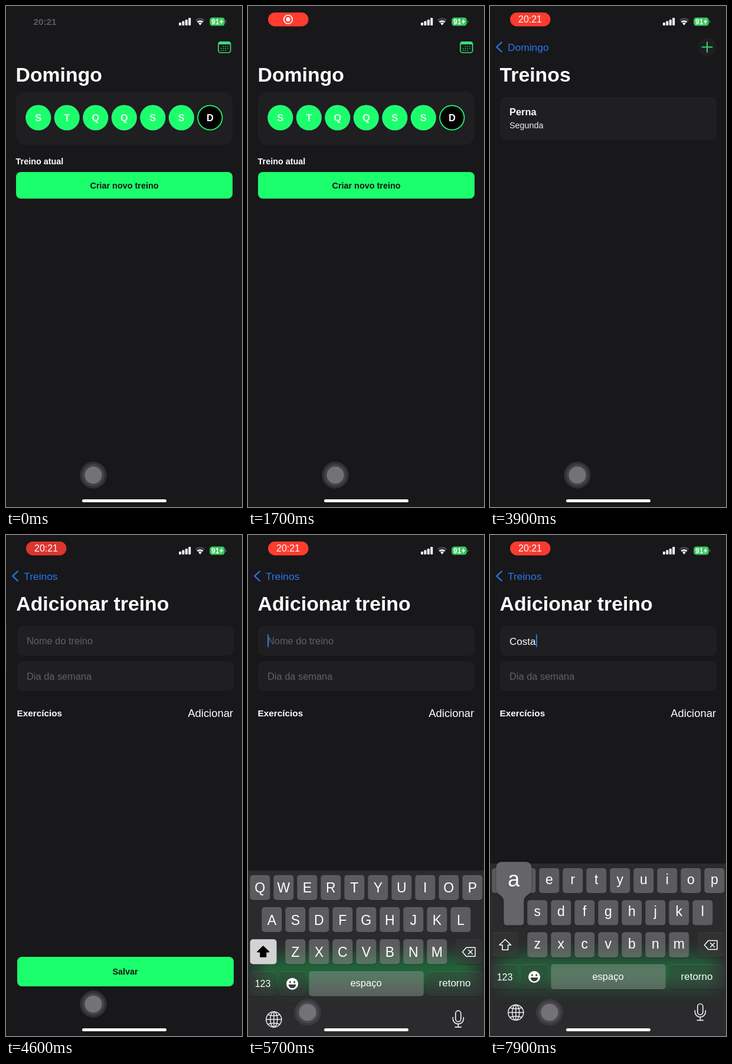
An HTML page with a canvas that plays this animation: 400x848 px, repeating every 8 s.

```html
<!DOCTYPE html>
<html lang="pt">
<head>
<meta charset="utf-8">
<title>Treinos</title>
<style>
  html, body { margin: 0; width: 100%; height: 100%; overflow: hidden; background: #18171a; }
  canvas { display: block; width: 400px; height: 848px; }
</style>
</head>
<body>
<canvas id="stage"></canvas>
<script>
const W = 400, H = 848, LOOP = 8000;
const canvas = document.getElementById('stage');
const dpr = window.devicePixelRatio || 1;
canvas.width = W * dpr;
canvas.height = H * dpr;
const c = canvas.getContext('2d');

const BG = '#18171a', CARD = '#1f1e21', GREEN = '#1cff6c', BLUE = '#2a78ee', HINT = '#626165';
const LIGHT = 'rgba(255,255,255,.275)', DARK = 'rgba(255,255,255,.085)';
const PUSH_LIST = 1750, PUSH_FORM = 4070, KEYBOARD = 5430;
const TYPED = [['C', 6750], ['o', 7050], ['s', 7320], ['t', 7580], ['a', 7840]];
const PRESS = 140;

const clamp = v => Math.max(0, Math.min(1, v));
const ramp = (t, from, len) => { const k = clamp((t - from) / len); return k * k * (3 - 2 * k); };
const spring = (ms, w) => ms <= 0 ? 0 : 1 - (1 + w * ms / 1000) * Math.exp(-w * ms / 1000);

function box(x, y, w, h, r, fill) {
  c.beginPath();
  c.roundRect(x, y, w, h, r);
  c.fillStyle = fill;
  c.fill();
}

function disc(x, y, r, fill) {
  c.beginPath();
  c.arc(x, y, r, 0, Math.PI * 2);
  c.fillStyle = fill;
  c.fill();
}

function line(points, color, width, close) {
  c.beginPath();
  points.forEach(([x, y], i) => i ? c.lineTo(x, y) : c.moveTo(x, y));
  if (close) c.closePath();
  c.strokeStyle = color;
  c.lineWidth = width;
  c.lineCap = c.lineJoin = 'round';
  c.stroke();
}

function text(str, x, y, size, color, align = 'left', weight = 400) {
  c.font = `${weight} ${size}px "Liberation Sans", Arial, sans-serif`;
  c.textAlign = align;
  c.fillStyle = color;
  c.fillText(str, x, y);
}

function layer(dx, dy, alpha, draw) {
  if (alpha <= 0) return;
  c.save();
  c.translate(dx, dy);
  c.globalAlpha *= alpha;
  draw();
  c.restore();
}

/* ---- screens ---- */

function home() {
  box(17, 145, 367, 90, 16, CARD);
  [...'STQQSSD'].forEach((day, i) => {
    const x = 54.8 + i * 48.5, today = i === 6;
    disc(x, 189, 21.6, today ? GREEN : '#2cf578');
    disc(x, 189, 19.8, today ? '#000' : GREEN);
    text(day, x, 194.8, 16.4, today ? '#fff' : '#e6ffee', 'center', 700);
  });
  text('Treino atual', 16.6, 268, 14.4, '#fff', 'left', 700);
  box(17, 281, 367, 45, 8, GREEN);
  text('Criar novo treino', 200.5, 308.5, 14.4, '#101512', 'center', 700);
}

function list() {
  box(17, 154, 367, 72, 8, CARD);
  text('Perna', 33, 185, 16.4, '#fff', 'left', 700);
  text('Segunda', 33, 206.5, 14.4, '#f0f0f0');
}

function form(t) {
  box(17, 154, 367, 50, 9, CARD);
  box(17, 214, 367, 50, 9, CARD);
  const value = TYPED.filter(([, at]) => t >= at).map(([ch]) => ch).join('');
  let caret = 34;
  if (value) {
    text(value, 33, 185.5, 17, '#fff');
    caret = 34.5 + c.measureText(value).width;
  } else {
    text('Nome do treino', 33, 185, 16.4, HINT);
  }
  const blink = (t - 5500) % 1000 < 500;
  if (t >= 5500 && (value || blink)) box(caret - 1, 168, 2, 22, 1, '#2f6df0');
  text('Dia da semana', 33, 245, 16.4, HINT);
  text('Exercícios', 16.6, 307, 15.3, '#fff', 'left', 700);
  text('Adicionar', 383, 308, 18.4, '#fff', 'right');
  box(17, 714, 367, 50, 8, GREEN);
  text('Salvar', 200, 744, 14.4, '#101512', 'center', 700);
}

function calendar() {
  c.strokeStyle = '#32e075';
  c.lineWidth = 1.7;
  c.beginPath();
  c.roundRect(360, 60.8, 20.6, 18.2, 3.5);
  c.stroke();
  box(360, 60.5, 20.6, 4.6, [3, 3, 0, 0], '#32e075');
  for (let row = 0; row < 3; row++)
    for (let col = 0; col < 4; col++)
      if (!(row === 0 && col === 0) && !(row === 2 && col === 3))
        disc(364.8 + col * 3.7, 68.3 + row * 3.5, 0.85, '#32e075');
}

function plus() {
  disc(368, 69.5, 15.5, '#1f1e21');
  line([[359.5, 69.5], [376.5, 69.5]], '#30d968', 2);
  line([[368, 61], [368, 78]], '#30d968', 2);
}

const screens = [
  { title: 'Domingo', icon: calendar, body: home },
  { title: 'Treinos', back: 'Domingo', icon: plus, body: list },
  { title: 'Adicionar treino', back: 'Treinos', body: form }
];

function header(s, titleDx, backDx, alpha) {
  layer(titleDx, 0, alpha, () => text(s.title, 16.5, 128, 33.8, '#fff', 'left', 700));
  if (s.back) {
    layer(0, 0, alpha, () => line([[19.8, 61.5], [11.2, 69.5], [19.8, 77.5]], BLUE, 2.3));
    layer(backDx, 0, alpha, () => text(s.back, 30, 76, 17.4, BLUE));
  }
  if (s.icon) layer(0, 0, alpha, s.icon);
}

function pages(t) {
  const next = t < PUSH_FORM ? 1 : 2;
  const since = t - (next === 1 ? PUSH_LIST : PUSH_FORM);
  const p = spring(since, 14), q = spring(since, 16);
  const from = screens[next - 1], to = screens[next];
  if (p < 0.9995) layer(-120 * p, 0, 1, () => from.body(t));
  if (p > 0) {
    c.fillStyle = `rgba(0,0,0,${0.1 * p * (1 - p)})`;
    c.fillRect(0, 0, W, H);
    const dx = p > 0.9995 ? 0 : W * (1 - p);
    layer(dx, 0, 1, () => {
      c.fillStyle = BG;
      c.fillRect(0, 0, W, H);
      to.body(t);
    });
  }
  header(from, -120 * q, -90 * q, clamp(1 - q * 1.6));
  if (q > 0) header(to, W * (1 - q), 110 * (1 - q), clamp(q * 1.4 - 0.3));
}

/* ---- status bar ---- */

function status(t) {
  const pill = ramp(t, 100, 350), clock = ramp(t, 3600, 250);
  layer(0, 0, 1 - pill, () => text('20:21', 66, 32, 15.3, '#5d5c60', 'center', 700));
  layer(0, 0, pill, () => {
    const k = 0.5 + 0.5 * Math.cos((t - 1700) / 1000 * Math.PI);
    box(34, 11, 68.5, 23.5, 11.7, `rgb(${220 + 35 * k},${53 + 7 * k},48)`);
    layer(0, 0, 1 - clock, () => {
      c.strokeStyle = '#fff';
      c.lineWidth = 1.7;
      c.beginPath();
      c.arc(68, 22.7, 7.2, 0, Math.PI * 2);
      c.stroke();
      disc(68, 22.7, 3.6, '#fff');
    });
    layer(0, 0, clock, () => text('20:21', 68, 28.4, 16, '#fff', 'center'));
  });

  [5, 7.5, 10, 13].forEach((h, i) => box(293 + i * 5.4, 33 - h, 4, h, 1.2, '#fff'));

  const a = -Math.PI * 0.75, b = -Math.PI * 0.25;
  [[10.4, '#4b4a4e'], [6.6, '#fff']].forEach(([r, color]) => {
    c.beginPath();
    c.arc(329, 32, r, a, b);
    c.strokeStyle = color;
    c.lineWidth = 2.5;
    c.lineCap = 'butt';
    c.stroke();
  });
  c.beginPath();
  c.moveTo(329, 32.8);
  c.arc(329, 32, 4, a, b);
  c.fillStyle = '#fff';
  c.fill();

  box(345.3, 19.5, 25.4, 14, 4.2, '#35c759');
  box(371.6, 24.3, 1.7, 4.6, 1, '#4d6b54');
  text('91', 354.8, 31, 12.2, '#fff', 'center', 700);
  c.beginPath();
  [[366.2, 21.6], [361.8, 27.4], [364.7, 27.4], [363.6, 31.6], [368.6, 25.6], [365.5, 25.6]]
    .forEach(([x, y]) => c.lineTo(x, y));
  c.fillStyle = '#fff';
  c.fill();
}

/* ---- keyboard ---- */

const ROWS = [
  { keys: 'qwertyuiop', x: 3.3, y: 564 },
  { keys: 'asdfghjkl', x: 23.3, y: 618.3 },
  { keys: 'zxcvbnm', x: 63.3, y: 672.6 }
];
const KEY_W = 34, KEY_H = 42.3, STEP = 40;

function key(x, y, w, fill) {
  box(x, y + 1, w, KEY_H, 5, 'rgba(0,0,0,.3)');
  box(x, y, w, KEY_H, 5, fill);
}

function glow() {
  c.save();
  c.beginPath();
  c.rect(0, 556, W, H - 556);
  c.clip();
  c.filter = `blur(${15 * dpr}px)`;
  box(14, 714, 372, 50, 8, 'rgba(20,190,80,.42)');
  c.restore();
}

function popup(x, y, ch) {
  const l = x - 13, r = x + KEY_W + 13, top = y - 65;
  c.beginPath();
  c.moveTo(l + 9, top);
  c.arcTo(r, top, r, top + 9, 9);
  c.lineTo(r, top + 44);
  c.bezierCurveTo(r, top + 58, x + KEY_W, top + 54, x + KEY_W, top + 68);
  c.arcTo(x + KEY_W, y + KEY_H, x, y + KEY_H, 5);
  c.arcTo(x, y + KEY_H, x, top + 68, 5);
  c.lineTo(x, top + 68);
  c.bezierCurveTo(x, top + 54, l, top + 58, l, top + 44);
  c.arcTo(l, top, l + 9, top, 9);
  c.fillStyle = '#656468';
  c.shadowColor = 'rgba(0,0,0,.35)';
  c.shadowBlur = 4 * dpr;
  c.fill();
  c.shadowColor = 'transparent';
  text(ch, x + KEY_W / 2, top + 42, 36, '#fff', 'center');
}

function shiftArrow(color, filled) {
  const pts = [[25.7, 684.5], [35.5, 694], [30.5, 694], [30.5, 702.3], [21, 702.3], [21, 694], [16, 694]];
  line(pts, color, 1.6, true);
  if (filled) { c.fillStyle = color; c.fill(); }
}

function globe(x, y) {
  const ink = '#ececee';
  c.strokeStyle = ink;
  c.lineWidth = 1.5;
  [13, 6].forEach(rx => {
    c.beginPath();
    c.ellipse(x, y, rx, 13, 0, 0, Math.PI * 2);
    c.stroke();
  });
  line([[x - 13, y], [x + 13, y]], ink, 1.5);
  line([[x, y - 13], [x, y + 13]], ink, 1.5);
  [-1, 1].forEach(s => {
    c.beginPath();
    c.moveTo(x - 10, y + 8 * s);
    c.quadraticCurveTo(x, y + 4.5 * s, x + 10, y + 8 * s);
    c.stroke();
  });
}

function mic(x, y) {
  const ink = '#ececee';
  c.strokeStyle = ink;
  c.lineWidth = 1.7;
  c.beginPath();
  c.roundRect(x - 4.5, y - 13.5, 9, 18.5, 4.5);
  c.stroke();
  c.beginPath();
  c.moveTo(x - 9, y - 2);
  c.lineTo(x - 9, y);
  c.arc(x, y, 9, Math.PI, 0, true);
  c.lineTo(x + 9, y - 2);
  c.stroke();
  line([[x, y + 9], [x, y + 14]], ink, 1.7);
  line([[x - 5, y + 14.3], [x + 5, y + 14.3]], ink, 1.7);
}

function smiley(x, y) {
  disc(x, y, 10, '#fff');
  [-3.6, 3.6].forEach(d => {
    c.beginPath();
    c.ellipse(x + d, y - 3, 1.3, 2, 0, 0, Math.PI * 2);
    c.fillStyle = '#34403a';
    c.fill();
  });
  c.beginPath();
  c.arc(x, y + 1, 6.4, 0, Math.PI);
  c.closePath();
  c.fill();
}

function keyboard(t) {
  const dy = 292 * (1 - spring(t - KEYBOARD, 18.5));
  if (t < KEYBOARD) return;
  layer(0, dy, 1, () => {
    c.fillStyle = '#2b2a2d';
    c.fillRect(0, 556, W, H);
  });
  c.save();
  c.beginPath();
  c.rect(0, 556 + dy, W, H);
  c.clip();
  glow();
  c.restore();

  layer(0, dy < 0.2 ? 0 : dy, 1, () => {
    const upper = t < TYPED[0][1] + 60;
    const hit = TYPED.find(([, at]) => t >= at - 20 && t < at + PRESS);
    let pop = null;
    ROWS.forEach(({ keys, x, y }) => [...keys].forEach((ch, i) => {
      const kx = x + i * STEP;
      if (hit && hit[0].toLowerCase() === ch) { pop = [kx, y, hit[0]]; return; }
      key(kx, y, KEY_W, LIGHT);
      text(upper ? ch.toUpperCase() : ch, kx + KEY_W / 2, y + (upper ? 29.6 : 27), 23, '#fff', 'center');
    }));

    key(3.5, 672.6, 45, upper ? '#d3d3d5' : DARK);
    shiftArrow(upper ? '#000' : '#fff', upper);
    key(352, 672.6, 45, DARK);
    line([[363.5, 694], [370, 686.5], [385, 686.5], [385, 701.5], [370, 701.5]], '#fff', 1.5, true);
    line([[373.5, 690.5], [380.5, 697.5]], '#fff', 1.5);
    line([[380.5, 690.5], [373.5, 697.5]], '#fff', 1.5);

    key(3.3, 726.8, 44, DARK);
    text('123', 25, 753.5, 16, '#fff', 'center');
    key(53, 726.8, 44.5, DARK);
    smiley(75, 748);
    key(103.3, 726.8, 194.5, LIGHT);
    text('espaço', 200, 752.5, 16.5, '#fff', 'center');
    key(304, 726.8, 93, DARK);
    text('retorno', 350.5, 752.5, 17, '#fff', 'center');

    globe(43.8, 808.3);
    mic(356.3, 807);
    if (pop) popup(...pop);
  });
}

function touchDot(t) {
  const k = ramp(t, KEYBOARD, 230);
  const x = 148 - 47 * k, y = 794 + 14 * k;
  disc(x, y, 22.8, 'rgba(74,73,77,.5)');
  disc(x, y, 18.8, 'rgba(88,87,91,.5)');
  disc(x, y, 14.6, '#737276');
}

function draw(t) {
  c.setTransform(dpr, 0, 0, dpr, 0, 0);
  c.fillStyle = BG;
  c.fillRect(0, 0, W, H);
  pages(t);
  status(t);
  keyboard(t);
  touchDot(t);
  box(129, 835, 143, 5, 2.5, '#fff');
}

const start = performance.now();
function tick() {
  draw((performance.now() - start) % LOOP);
  requestAnimationFrame(tick);
}
tick();
</script>
</body>
</html>
```
